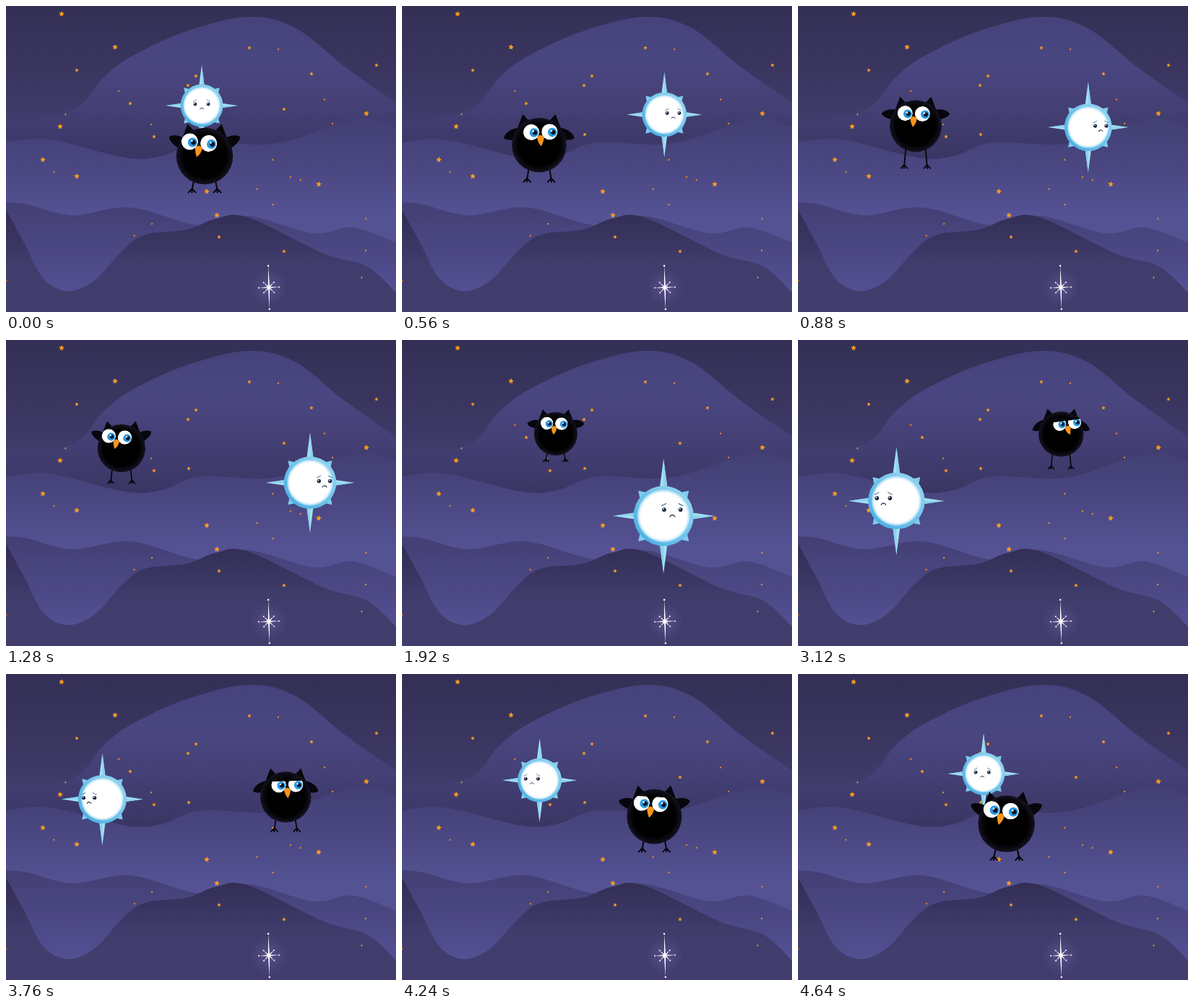
Animation, 540 px wide and 424 px high, one loop 4720 ms. Source, as an HTML page with a canvas:

```html
<!DOCTYPE html>
<html lang="en">
<head>
<meta charset="utf-8">
<title>Owl and star</title>
<style>
html, body { margin: 0; width: 100%; height: 100%; overflow: hidden; background: #403c6c; }
canvas { display: block; width: 540px; height: 424px; }
</style>
</head>
<body>
<canvas id="stage" width="540" height="424"></canvas>
<script>
const W = 540, H = 424, LOOP = 4720, STEP = 80;
const TAU = Math.PI * 2, DEG = Math.PI / 180;
const { sin, cos, max, min, sqrt } = Math;
const stage = document.getElementById('stage');
const ctx = stage.getContext('2d');

// Where the owl looks, eight even beats per loop: left < 0 < right
const GAZE = [-.19, .05, -.2, -.1, .1, .3, .14, -.12];

function gazeAt(u) {
  const n = GAZE.length, i = Math.floor(u * n), f = u * n - i;
  const ease = (1 - cos(f * Math.PI)) / 2;
  return GAZE[i] + (GAZE[(i + 1) % n] - GAZE[i]) * ease;
}

// The sun circles clockwise, slower at the far end
function sunPose(p) {
  const a = p - 7 * DEG * sin(p), near = (1 - cos(a)) / 2;
  const reach = 56 + 26 * near;
  return {
    x: 271 + 150 * sin(a),
    y: 197 - 59 * cos(a),
    reach,
    fx: 20 * sin(a),
    fy: -2 - 13 * near ** 6,
    spread: reach * .163 * (1 - .32 * sin(a) ** 2)
  };
}

// The owl runs on the opposite side and leaps twice per loop
function owlPose(p) {
  const a = p + DEG * (6 * sin(p) - 1);
  const leap = max(0, -cos(2 * p + 30 * DEG)) ** 2;
  const gaze = gazeAt(p / TAU);
  return {
    x: 273 - 116 * sin(a),
    y: 166 + 42 * cos(a) - 14 * leap,
    r: 34.3 + 5 * cos(a),
    leg: 1.18 + .38 * leap,
    gaze,
    tilt: -28 * DEG * gaze,
    wing: DEG * max(-33, min(24, 6 + 200 * gaze)),
    lid: .3 * sqrt(max(0, cos(p - 238 * DEG)))
  };
}

function circle(g, x, y, r, fill) {
  g.beginPath();
  g.arc(x, y, r, 0, TAU);
  g.fillStyle = fill;
  g.fill();
}

function poly(g, pts, fill) {
  g.beginPath();
  for (let i = 0; i < pts.length; i += 2) g.lineTo(pts[i], pts[i + 1]);
  g.closePath();
  g.fillStyle = fill;
  g.fill();
}

function shade(g, y0, y1, ...colors) {
  const s = g.createLinearGradient(0, y0, 0, y1);
  colors.forEach((c, i) => s.addColorStop(i / (colors.length - 1), c));
  return s;
}

// Smooth ridge through a few points, filled to the bottom
function hill(g, pts, fill) {
  const n = pts.length / 2;
  const at = i => { const k = max(0, min(n - 1, i)); return [pts[2 * k], pts[2 * k + 1]]; };
  g.beginPath();
  g.moveTo(...at(0));
  for (let i = 0; i < n - 1; i++) {
    const [a, b, c, d] = [at(i - 1), at(i), at(i + 1), at(i + 2)];
    g.bezierCurveTo(b[0] + (c[0] - a[0]) / 6, b[1] + (c[1] - a[1]) / 6,
      c[0] - (d[0] - b[0]) / 6, c[1] - (d[1] - b[1]) / 6, c[0], c[1]);
  }
  g.lineTo(W, H);
  g.lineTo(0, H);
  g.fillStyle = fill;
  g.fill();
}

function smallStar(g, x, y, r) {
  const pts = [];
  for (let i = 0; i < 10; i++) {
    const a = i * TAU / 10 - 1.45, q = i % 2 ? r * .5 : r;
    pts.push(x + q * cos(a), y + q * sin(a));
  }
  poly(g, pts, '#f79a1f');
}

function sparkle(g, x, y) {
  const glow = g.createRadialGradient(x, y, 2, x, y, 26);
  glow.addColorStop(0, 'rgba(140,125,200,.28)');
  glow.addColorStop(1, 'rgba(140,125,200,0)');
  circle(g, x, y, 26, glow);
  g.save();
  g.translate(x, y);
  g.rotate(-.03);
  for (let i = 0; i < 8; i++) {
    const len = i % 4 === 0 ? 30 : i % 2 ? 10 : 14;
    poly(g, [-1.1, 0, 0, -len, 1.1, 0], '#fff');
    circle(g, 0, -len, i % 4 ? 1 : 1.3, '#fff');
    g.rotate(TAU / 8);
  }
  g.restore();
}

function drawStars(g) {
  const big = [77, 11, 75, 167, 98, 236, 278, 257, 433, 247, 499, 149, 292, 290, 151, 57, 51, 213];
  const mid = [98, 89, 337, 58, 513, 82, 252, 110, 263, 97, 172, 135, 295, 320, 385, 340,
    205, 181, 253, 178, 385, 143, 423, 94];
  for (let i = 0; i < big.length; i += 2) smallStar(g, big[i], big[i + 1], 4);
  for (let i = 0; i < mid.length; i += 2) smallStar(g, mid[i], mid[i + 1], 2.8);
  let seed = 7;
  const rand = () => (seed = seed * 16807 % 2147483647) / 2147483647;
  for (let i = 0; i < 18; i++) smallStar(g, rand() * W, 40 + rand() * 370, 1.6);
}

function makeSky() {
  const sky = document.createElement('canvas');
  sky.width = W;
  sky.height = H;
  const g = sky.getContext('2d');
  g.fillStyle = shade(g, 0, 165, '#332f55', '#39355f', '#413d6d');
  g.fillRect(0, 0, W, H);
  hill(g, [0, 160, 92, 145, 135, 99, 175, 69, 250, 35, 335, 15, 400, 30, 470, 85, 540, 134],
    shade(g, 15, 208, '#46427b', '#4a4681', '#443f74', '#3a3664'));
  hill(g, [0, 189, 60, 185, 165, 210, 215, 208, 270, 189, 370, 191, 455, 165, 500, 156, 540, 168],
    shade(g, 160, 290, '#434075', '#4a4782', '#555294'));
  hill(g, [0, 272, 30, 275, 92, 290, 172, 279, 268, 304, 335, 291, 425, 315, 480, 307, 540, 328],
    shade(g, 278, 395, '#444075', '#4b4783', '#535093'));
  hill(g, [0, 282, 25, 328, 52, 378, 86, 395, 123, 380, 160, 340, 192, 317, 250, 310, 290, 295,
    335, 293, 440, 343, 500, 361, 540, 397],
    shade(g, 293, 424, '#332f57', '#403c6c', '#413d6d'));
  drawStars(g);
  sparkle(g, 364, 390);
  return sky;
}

function drawFace(s, spread) {
  const eye = 2.5 * sqrt(s);
  ctx.lineCap = 'round';
  ctx.lineWidth = s;
  for (const side of [-1, 1]) {
    ctx.save();
    ctx.translate(side * spread, 0);
    circle(ctx, 0, 0, eye, '#202a48');
    circle(ctx, -eye * .3, -eye * .35, eye * .32, '#fff');
    ctx.beginPath();
    ctx.moveTo(side * 2.4 * s, -4 * s);
    ctx.quadraticCurveTo(0, -5 * s, -side * 2 * s, -6.3 * s);
    ctx.strokeStyle = '#5e86a8';
    ctx.stroke();
    ctx.restore();
  }
  ctx.beginPath();
  ctx.arc(0, 8.2 * s, 2.7 * s, Math.PI * 1.12, Math.PI * 1.88);
  ctx.strokeStyle = '#2b3350';
  ctx.stroke();
}

function drawSun({ x, y, reach, fx, fy, spread }) {
  const r = reach * .525;
  ctx.save();
  ctx.translate(x, y);
  for (let i = 0; i < 8; i++) {
    if (i % 2) {
      poly(ctx, [-r * .16, -r * .94, 0, -r * 1.19, r * .16, -r * .94], '#7fcdee');
    } else {
      const len = i % 4 ? reach * .885 : reach;
      poly(ctx, [-r * .25, 0, 0, -len, r * .25, 0], '#a3dff3');
      poly(ctx, [0, 0, 0, -len, r * .25, 0], '#8cd3ee');
    }
    ctx.rotate(TAU / 8);
  }
  const ring = ctx.createLinearGradient(r * .7, -r * .7, -r * .7, r * .7);
  ring.addColorStop(0, '#8fd3f1');
  ring.addColorStop(1, '#4fb1e4');
  circle(ctx, 0, 0, r, ring);
  const disc = ctx.createRadialGradient(0, 0, r * .76, 0, 0, r * .9);
  disc.addColorStop(0, '#fff');
  disc.addColorStop(.5, 'rgba(225,244,252,.85)');
  disc.addColorStop(1, 'rgba(190,230,247,0)');
  circle(ctx, 0, 0, r * .9, disc);
  ctx.translate(fx, fy);
  drawFace(r / 31, spread);
  ctx.restore();
}

function drawEye(side, lid) {
  ctx.save();
  ctx.translate(side * .335, 0);
  ctx.beginPath();
  ctx.arc(0, 0, .295, 0, TAU);
  ctx.clip();
  ctx.fillStyle = '#fff';
  ctx.fill();
  ctx.translate(.1, .02);
  circle(ctx, 0, 0, .165, '#2a9ade');
  circle(ctx, .03, 0, .085, '#0b1730');
  circle(ctx, -.03, -.05, .035, '#fff');
  ctx.fillStyle = '#020204';
  ctx.fillRect(-.6, -.615, 1.2, .3 + lid * .59);
  ctx.restore();
}

function drawLimbs(leg, wing) {
  const ink = '#07060c';
  ctx.lineCap = 'round';
  ctx.lineWidth = .052;
  ctx.strokeStyle = ink;
  for (const side of [-1, 1]) {
    ctx.save();
    ctx.scale(side, 1);
    ctx.beginPath();
    ctx.moveTo(.38, .85);
    ctx.lineTo(.44, leg);
    for (const toe of [-.12, .01, .13]) {
      ctx.moveTo(.44, leg - .03);
      ctx.lineTo(.44 + toe, leg + .1);
    }
    ctx.stroke();
    poly(ctx, [.36, -.88, .6, -1.13, .82, -.55], ink);
    ctx.translate(.78, -.42);
    ctx.rotate(wing);
    ctx.beginPath();
    ctx.moveTo(-.12, -.2);
    ctx.bezierCurveTo(.15, -.24, .42, -.18, .54, .02);
    ctx.bezierCurveTo(.46, .16, .2, .2, -.1, .2);
    ctx.fillStyle = ink;
    ctx.fill();
    ctx.restore();
  }
}

function drawOwl({ x, y, r, leg, gaze, tilt, wing, lid }) {
  ctx.save();
  ctx.translate(x, y);
  ctx.scale(r, r);
  drawLimbs(leg, wing);
  const body = ctx.createRadialGradient(0, 0, .75, 0, 0, 1);
  body.addColorStop(0, '#000');
  body.addColorStop(1, '#151220');
  circle(ctx, 0, 0, 1, body);

  ctx.translate(gaze, -.48);
  ctx.rotate(tilt);
  drawEye(-1, lid);
  drawEye(1, lid);
  ctx.beginPath();
  ctx.moveTo(-.13, .2);
  ctx.quadraticCurveTo(0, .02, .13, .2);
  ctx.quadraticCurveTo(.1, .4, gaze * .25, .52);
  ctx.quadraticCurveTo(-.1, .4, -.13, .2);
  ctx.fillStyle = '#f7941d';
  ctx.fill();
  ctx.restore();
}

const sky = makeSky();

function draw(now) {
  const t = Math.floor((now % LOOP) / STEP) * STEP;
  const p = t / LOOP * TAU;
  const sun = sunPose(p), owl = owlPose(p);
  ctx.drawImage(sky, 0, 0);
  if (owl.y > sun.y) {
    drawSun(sun);
    drawOwl(owl);
  } else {
    drawOwl(owl);
    drawSun(sun);
  }
}

const start = performance.now();
function tick() {
  draw(performance.now() - start);
  requestAnimationFrame(tick);
}
tick();
</script>
</body>
</html>
```
